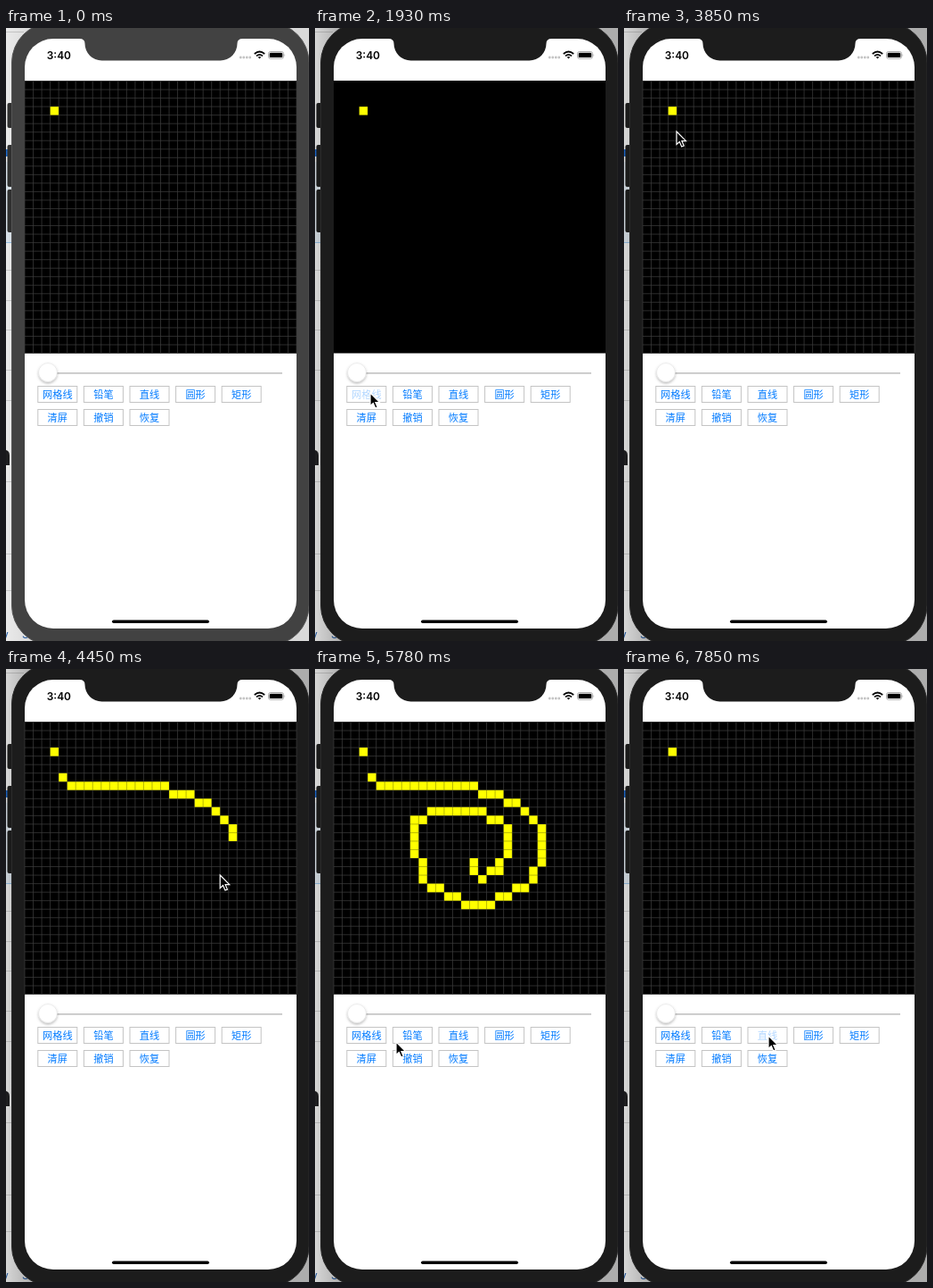
An HTML page that plays this animation: 340x687 px, repeating every 8000 ms.

```html
<!DOCTYPE html>
<html lang="zh">
<head>
<meta charset="utf-8">
<style>
  html, body { margin: 0; width: 100%; height: 100%; overflow: hidden; background: #f2f2f2; }
  svg { display: block; width: 340px; height: 687px; --body: #424242; --rim: #555; --key: #303030; --shade: .12; }
  svg.active { --body: #1c1c1c; --rim: #2c2c2c; --key: #1b1b1b; --shade: .3; }
  .body { fill: var(--body); }
  .rim { stroke: var(--rim); }
  .key { fill: var(--key); }
  .shade { opacity: var(--shade); }
  .clock { font: 600 11.9px Inter, sans-serif; }
  .side { font: 12px Inter, sans-serif; fill: #2360b0; }
  .button text { font: 11.2px "Noto Sans CJK SC", "Noto Sans CJK", sans-serif; fill: #007aff; text-anchor: middle; }
  .button rect { fill: #fff; stroke: #c4c4c4; }
</style>
</head>
<body>
<svg id="stage" viewBox="0 0 340 687">
  <defs>
    <linearGradient id="fade"><stop offset="0" stop-opacity=".45"/><stop offset=".5"/></linearGradient>
    <filter id="soft" x="-50%" y="-50%" width="200%" height="200%">
      <feDropShadow dx="0" dy="1.5" stdDeviation="1.4" flood-opacity=".3"/>
    </filter>
  </defs>

  <!-- desktop behind the phone -->
  <rect width="340" height="687" fill="#f7f7f7"/>
  <rect y="150" width="8" height="90" fill="#e4edf5"/>
  <path d="M0 4.5H20M0 271.5H8M0 305.5H8M0 338.5H8M0 383.5H8M0 417.5H8M0 508.5H8M0 589.5H8M0 630.5H10" stroke="#d2d2d2"/>
  <path d="M0 240.5H8" stroke="#9cc8ee"/>
  <rect y="136" width="3" height="8" fill="#1f6fd6"/>
  <text class="side" x="-4" y="684">y</text>
  <text class="side" x="18" y="684">Su</text>
  <rect class="shade" width="60" height="687" fill="url(#fade)"/>
  <rect class="shade" x="300" width="40" height="687"/>
  <path d="M0 473q4 1 4 6v11H0z" fill="#1d1d1f"/>

  <!-- phone -->
  <g class="key">
    <rect x="1.500" y="84" width="8" height="28" rx="2"/>
    <rect x="1.500" y="131" width="8" height="47" rx="2"/>
    <rect x="1.500" y="181" width="8" height="48" rx="2"/>
    <rect x="336" y="131" width="6" height="75" rx="2"/>
  </g>
  <rect class="body rim" x="6.500" y="-6" width="333.500" height="698" rx="45"/>
  <rect x="21" y="12" width="305" height="661" rx="32" fill="#fff"/>
  <path class="body" d="M82.500 11v1q6 0 6 5.500a19 19 0 0 0 19 19h133a19 19 0 0 0 19-19q0-5.500 6-5.500v-1z"/>
  <text class="clock" x="45.800" y="34.500">3:40</text>
  <path d="M263.300 33h11" stroke="#c3c3c3" stroke-width="2.800" stroke-linecap="round" stroke-dasharray="0 3.500"/>
  <path d="M278.800 29q5.700-5 11.400 0M281 31.300q3.500-3 7 0" fill="none" stroke="#000" stroke-width="1.700"/>
  <path d="M282.700 32.600q1.800-1.300 3.600 0L284.500 34.500z"/>
  <rect x="294.500" y="26.500" width="17" height="7.800" rx="2.200" fill="none" stroke="#999" stroke-width=".8"/>
  <rect x="295.700" y="27.700" width="14.600" height="5.400" rx="1.200"/>
  <path d="M312.600 29v3q1.200-1.500 0-3" fill="#999"/>

  <!-- drawing board -->
  <rect x="21" y="59" width="305" height="305.500"/>
  <path id="grid" stroke="#3c3c3c" stroke-width=".75"/>
  <path id="cells" fill="#ff0" stroke="#000" stroke-opacity=".3" stroke-width=".5"/>

  <!-- controls -->
  <path d="M47 386.800H310" stroke="#b0b0b0" stroke-width="1.300"/>
  <circle cx="47" cy="386" r="10.400" fill="#fff" stroke="#ddd" stroke-width=".5" filter="url(#soft)"/>
  <g id="buttons"></g>
  <rect x="119" y="663.500" width="109" height="3.600" rx="1.800"/>

  <path id="cursor" d="M0 0V14.500L3.300 11.500 5.700 17 8.200 16 5.900 10.600H10.500Z" stroke="#fff" stroke-width="1.200"/>
</svg>
<script>
const LOOP = 8000, STEP = LOOP / 54;
const LEFT = 21, TOP = 59.5, SIZE = 305, CELLS = 32, CELL = SIZE / CELLS;
const $ = id => document.getElementById(id);
const mix = (a, b, p) => a + (b - a) * p;
const ease = p => p * p * (3 - 2 * p);

// the pencil stroke: straight runs between bends, snapped to grid cells
const bends = [
  [4, 6], [5, 7], [16, 7], [17, 7.6], [21, 9.2], [24, 12], [24, 16], [22, 18.9], [18, 21], [15, 21],
  [10.2, 18], [9.3, 15], [9, 11], [11, 10], [17, 10], [20, 12], [20, 15], [18.6, 16.9], [17, 18], [15.9, 16]
];
const stroke = [bends[0]];
bends.slice(1).forEach(([x, y], i) => {
  const [px, py] = bends[i];
  const steps = Math.ceil(Math.max(Math.abs(x - px), Math.abs(y - py)));
  for (let k = 1; k <= steps; k++)
    stroke.push([mix(px, x, k / steps), mix(py, y, k / steps)].map(Math.round));
});

// the pointer's glides between rests: first step, last step, target
const glides = [
  [4, 8, 55, 426], [8, 10, 62, 409], [18, 21, 114, 411], [23, 26, 59, 116],
  [36, 38, 118, 410], [38, 39, 91, 418], [39, 43, 62, 440], [47, 49, 162, 411]
];
const presses = [[13, 0], [16, 0], [23, 1], [46, 5], [53, 2]];
const DRAW = 27, DRAW_END = 36, CLEAR = 47, PACE = 7, LEAD = .7;

const count = n => Math.max(0, Math.min(stroke.length, Math.round(1 + PACE * (n - DRAW))));
const corner = ([c, r]) => [LEFT + c * CELL, TOP + r * CELL];
const square = cell => `M${corner(cell)}h${CELL}v${CELL}h${-CELL}z`;
const tip = n => corner(stroke[count(n + LEAD) - 1]);

function pointer(n) {
  if (n >= DRAW && n <= DRAW_END) return tip(n);
  let [x, y] = n > DRAW_END ? tip(DRAW_END) : [124, 217];
  for (const [from, to, tx, ty] of glides) {
    if (n > DRAW_END && from < DRAW_END || n <= from) continue;
    const p = ease(Math.min(1, (n - from) / (to - from)));
    x = mix(x, tx, p);
    y = mix(y, ty, p);
  }
  return [x, y];
}

let lines = "";
for (let i = 0; i <= CELLS; i++) {
  const [x, y] = corner([i, i]);
  lines += `M${x} ${TOP}v${SIZE}M${LEFT} ${y}h${SIZE}`;
}
$("grid").setAttribute("d", lines);

$("buttons").innerHTML = ["网格线", "铅笔", "直线", "圆形", "矩形", "清屏", "撤销", "恢复"].map((label, i) => {
  const x = 35.8 + i % 5 * 51.6, y = i < 5 ? 401.5 : 427.5;
  return `<g class="button"><rect x="${x}" y="${y}" width="44" height="18"/>
    <text x="${x + 22}" y="${y + 13.5}">${label}</text></g>`;
}).join("");
const labels = document.querySelectorAll(".button text");

function render(t) {
  const n = Math.min(53, Math.floor((t + 4) / STEP));
  $("stage").classList.toggle("active", n >= 13);
  $("grid").style.display = n >= 13 && n < 17 ? "none" : "";
  const visible = n < CLEAR ? stroke.slice(0, count(n)) : [];
  $("cells").setAttribute("d", [[3, 3], ...visible].map(square).join(""));
  labels.forEach((label, i) => label.style.opacity = presses.some(([step, b]) => step === n && b === i) ? .3 : 1);
  $("cursor").style.display = n < 4 ? "none" : "";
  $("cursor").setAttribute("transform", `translate(${pointer(n)})`);
}

const start = performance.now();
(function tick() {
  render((performance.now() - start) % LOOP);
  requestAnimationFrame(tick);
})();
</script>
</body>
</html>
```
